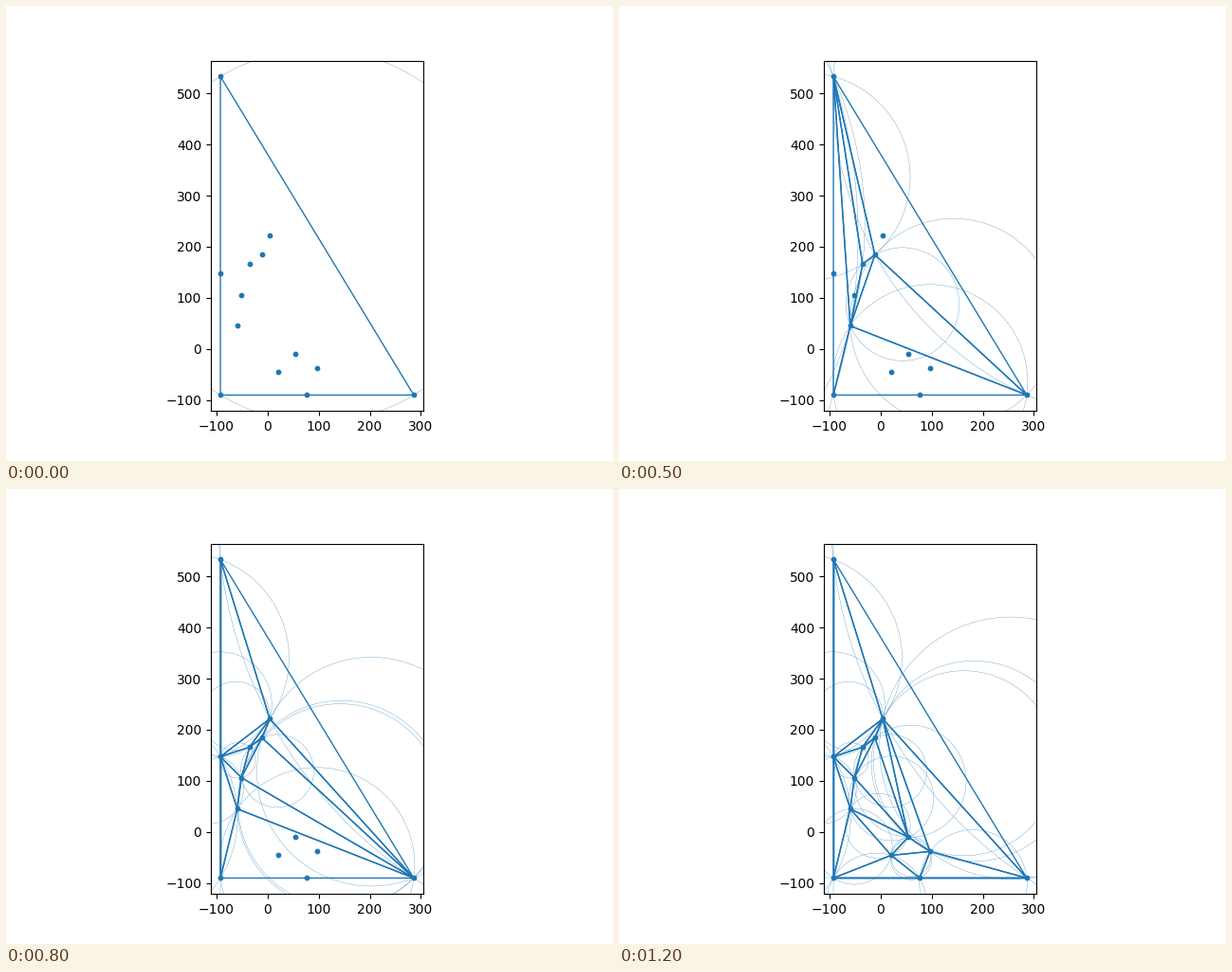
Recreate the animation shown at these times as a matplotlib script. Size 640 by 480 pixels, loop 1.3 s.

```python
"""Incremental Delaunay triangulation (Bowyer-Watson) with circumcircles."""
from collections import Counter
from itertools import combinations

import matplotlib.pyplot as plt
import numpy as np
from matplotlib.animation import FuncAnimation
from matplotlib.collections import PathCollection, PolyCollection
from matplotlib.path import Path

BLUE = "#1f77b4"
SITES = [(-59, 45.2), (-10.8, 184.3), (-35, 166), (-51, 106.3), (-92, 147.3),
         (4.5, 221.5), (54.3, -10), (21, -45.6), (76.7, -90), (97, -38)]

# Right triangle twice the size of the bounding box.
lo, hi = np.min(SITES, axis=0), np.max(SITES, axis=0)
w, h = 2 * (hi - lo)
HULL = [tuple(lo), (lo[0] + w, lo[1]), (lo[0], lo[1] + h)]
POINTS = np.array(HULL + SITES)


def circumcircle(tri):
    """Centre and radius, or None when the corners are collinear."""
    a, b, c = POINTS[list(tri)]
    m = 2 * np.array([b - a, c - a])
    if abs(np.linalg.det(m)) < 1e-6:
        return None
    centre = np.linalg.solve(m, [b @ b - a @ a, c @ c - a @ a])
    return centre, np.hypot(*(centre - a))


def insert(tris, i):
    def encloses(tri):
        circle = circumcircle(tri)
        return circle and np.hypot(*(POINTS[i] - circle[0])) < circle[1]

    bad = [t for t in tris if encloses(t)]
    edges = Counter(e for t in bad for e in combinations(sorted(t), 2))
    rim = [e for e, n in edges.items() if n == 1]
    return [t for t in tris if t not in bad] + [(*e, i) for e in rim]


def circle_path(tri):
    circle = circumcircle(tri)
    if circle:
        return Path.circle(*circle)
    # Collinear corners: the circle becomes a straight line.
    a, b = POINTS[list(tri[:2])]
    return Path([a - 2 * (b - a), b + 2 * (b - a)])


stages = [[(0, 1, 2)]] * 3
for k in range(3, len(POINTS)):
    stages.append(insert(stages[-1], k))

fig, ax = plt.subplots(figsize=(6.4, 4.8), dpi=100)
ax.set_aspect("equal")
ax.set_xlim(lo[0] - 0.05 * w, lo[0] + 1.05 * w)
ax.set_ylim(lo[1] - 0.05 * h, lo[1] + 1.05 * h)
ax.set_xticks(range(-100, 301, 100))
ax.set_yticks(range(-100, 501, 100))
ax.scatter(*POINTS.T, s=10, color=BLUE, zorder=3)

circles = PathCollection([], facecolors="none", edgecolors=BLUE, linewidths=0.2)
mesh = PolyCollection([], facecolors="none", edgecolors=BLUE, linewidths=1, zorder=2)
for group in (circles, mesh):
    ax.add_collection(group, autolim=False)


def update(step):
    tris = stages[step]
    mesh.set_verts([POINTS[list(t)] for t in tris])
    circles.set_paths([circle_path(t) for t in tris])
    return circles, mesh


anim = FuncAnimation(fig, update, frames=len(stages), interval=100,
                     repeat=True, repeat_delay=0)
plt.show()
```
